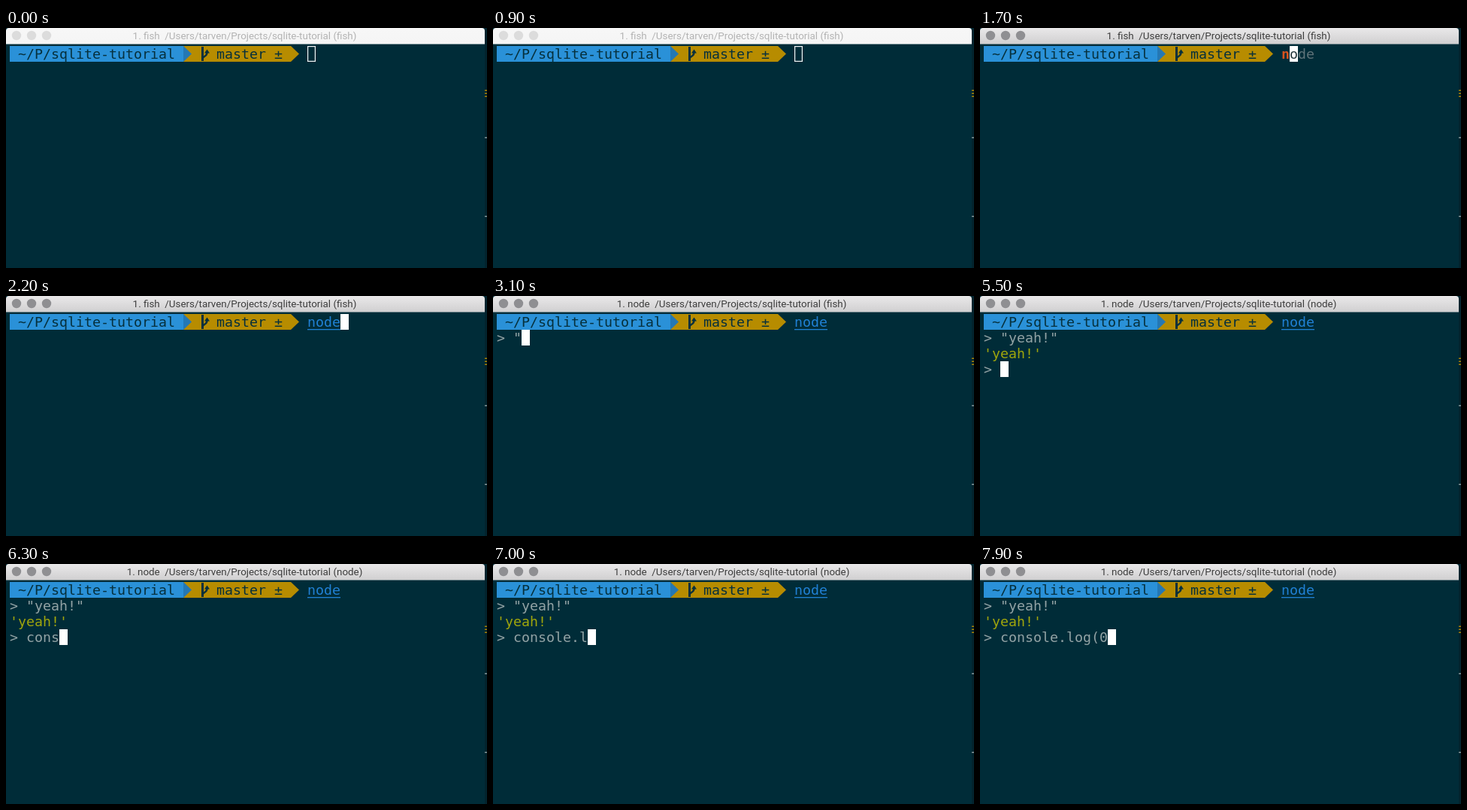
These frames come from a looping animation (640 by 320 pixels, 8000 ms). An HTML page with a canvas:

```html
<!DOCTYPE html>
<html lang="en">
<head>
<meta charset="utf-8">
<title>Terminal</title>
<style>
  html, body { margin: 0; width: 640px; height: 320px; overflow: hidden; background: #002c38; }
  canvas { display: block; }
</style>
</head>
<body>
<canvas id="stage" width="640" height="320"></canvas>
<script>
const ctx = document.getElementById('stage').getContext('2d');
const LOOP = 8000, LEFT = 5, TOP = 24, CELL = 11, ROW = 21;
const MONO = '18.27px "DejaVu Sans Mono", monospace';
const C = {
  bg: '#002c38', blue: '#2a91d8', fold: '#2478b4', gold: '#b78c00', ink: '#06303c',
  text: '#93a3a5', ghost: '#5f7379', red: '#d9531e', link: '#2080d4', green: '#a0a60c'
};

const ACTIVE = 1200, ENTER = 2400, READY = 2700, RENAME = 3400, RESULT = 5000;

// time at which each key lands
const command = { text: 'node', at: [1600, 1900, 2000, 2100] };
const first = { text: '"yeah!"', at: [2900, 3400, 3600, 3800, 4000, 4300, 4600] };
const second = {
  text: 'console.log(0',
  at: [5800, 6000, 6100, 6300, 6400, 6500, 6700, 6800, 7000, 7200, 7300, 7600, 7800]
};

const typed = (line, t) => line.text.slice(0, line.at.filter(k => k <= t).length);
const colX = c => LEFT + c * CELL;
const rowY = r => TOP + r * ROW;

function rect(x, y, w, h, color) {
  ctx.fillStyle = color;
  ctx.fillRect(x, y, w, h);
}

function write(text, col, row, color, weight = '') {
  ctx.font = weight + MONO;
  ctx.textAlign = 'left';
  ctx.fillStyle = color;
  ctx.fillText(text, colX(col), rowY(row) + 17);
}

function cursor(col, row, hollow) {
  if (hollow) {
    ctx.strokeStyle = '#f4f6f6';
    ctx.lineWidth = 1.2;
    ctx.strokeRect(colX(col) + .6, rowY(row) + .6, CELL - 1.2, ROW - 1.2);
  } else {
    rect(colX(col), rowY(row), CELL, ROW, '#fff');
  }
}

function arrow(col, color) {
  const x = colX(col), y = rowY(0);
  ctx.fillStyle = color;
  ctx.beginPath();
  ctx.moveTo(x, y);
  ctx.lineTo(x + CELL, y + ROW / 2);
  ctx.lineTo(x, y + ROW);
  ctx.fill();
}

function branchIcon(x, y) {
  rect(x, y + 1, 3, 19, C.ink);
  ctx.strokeStyle = ctx.fillStyle = C.ink;
  ctx.lineWidth = 2.4;
  ctx.beginPath();
  ctx.moveTo(x + 1.5, y + 17.5);
  ctx.bezierCurveTo(x + 2, y + 12.5, x + 7.5, y + 15, x + 7.5, y + 8.5);
  ctx.stroke();
  ctx.beginPath();
  ctx.moveTo(x + 7.5, y + 4.5);
  ctx.lineTo(x + 11, y + 9.5);
  ctx.lineTo(x + 4, y + 9.5);
  ctx.fill();
}

function titleBar(t) {
  const active = t >= ACTIVE;
  const fill = ctx.createLinearGradient(0, 0, 0, 21);
  fill.addColorStop(0, active ? '#e9e8e9' : '#f7f7f7');
  fill.addColorStop(1, active ? '#d1d0d1' : '#f5f5f5');
  ctx.fillStyle = fill;
  ctx.beginPath();
  ctx.roundRect(0, 0, 637, 21.5, [4, 4, 0, 0]);
  ctx.fill();

  ctx.fillStyle = active ? '#8f8f92' : '#dcdcdc';
  for (const x of [14, 34, 54]) {
    ctx.beginPath();
    ctx.arc(x, 10, 6.2, 0, Math.PI * 2);
    ctx.fill();
  }

  const job = t < ENTER ? 'fish' : 'node';
  const shell = t < RENAME ? 'fish' : 'node';
  ctx.font = '13.4px Roboto, Inter, sans-serif';
  ctx.textAlign = 'center';
  ctx.fillStyle = active ? '#3d3d3d' : '#b3b3b3';
  ctx.fillText(`1. ${job}  /Users/tarven/Projects/sqlite-tutorial (${shell})`, 317.5, 15);
}

function edge() {
  rect(637, 0, 3, 320, '#03242e');
  for (const y of [83, 87, 91]) rect(637, y - .5, 3, 1.5, '#a88207');
  for (const y of [146, 251]) rect(637, y - .5, 3, 1.5, '#84959a');
}

function prompt() {
  rect(LEFT, TOP, 21 * CELL, ROW, C.blue);
  rect(colX(21), TOP, 13 * CELL, ROW, C.gold);
  arrow(21, C.fold);
  arrow(34, C.gold);
  write('~/P/sqlite-tutorial', 1, 0, C.ink);
  branchIcon(260, TOP);
  write('master ±', 25, 0, C.ink);
}

function shellLine(t) {
  const entry = typed(command, t), n = entry.length;
  if (n === 4) {
    write(entry, 36, 0, C.link);
    rect(colX(36), 44, 4 * CELL, 1.3, C.link);
  } else if (n) {
    write(command.text.slice(n), 36 + n, 0, C.ghost);
    write(entry, 36, 0, C.red, 'bold ');
  }
  if (t < ENTER) {
    cursor(36 + n, 0, t < ACTIVE);
    if (n && n < 4) write(command.text[n], 36 + n, 0, '#26373d');
  } else if (t < READY) {
    cursor(0, 1);
  }
}

function inputLine(line, row, t, live) {
  const entry = typed(line, t);
  write('> ' + entry, 0, row, C.text);
  if (live) cursor(2 + entry.length, row);
}

function draw(t) {
  rect(0, 0, 640, 320, C.bg);
  edge();
  titleBar(t);
  prompt();
  shellLine(t);
  if (t >= READY) inputLine(first, 1, t, t < RESULT);
  if (t >= RESULT) {
    write("'yeah!'", 0, 2, C.green);
    inputLine(second, 3, t, true);
  }
}

const start = performance.now();
function tick() {
  draw((performance.now() - start) % LOOP);
  requestAnimationFrame(tick);
}
tick();
</script>
</body>
</html>
```
